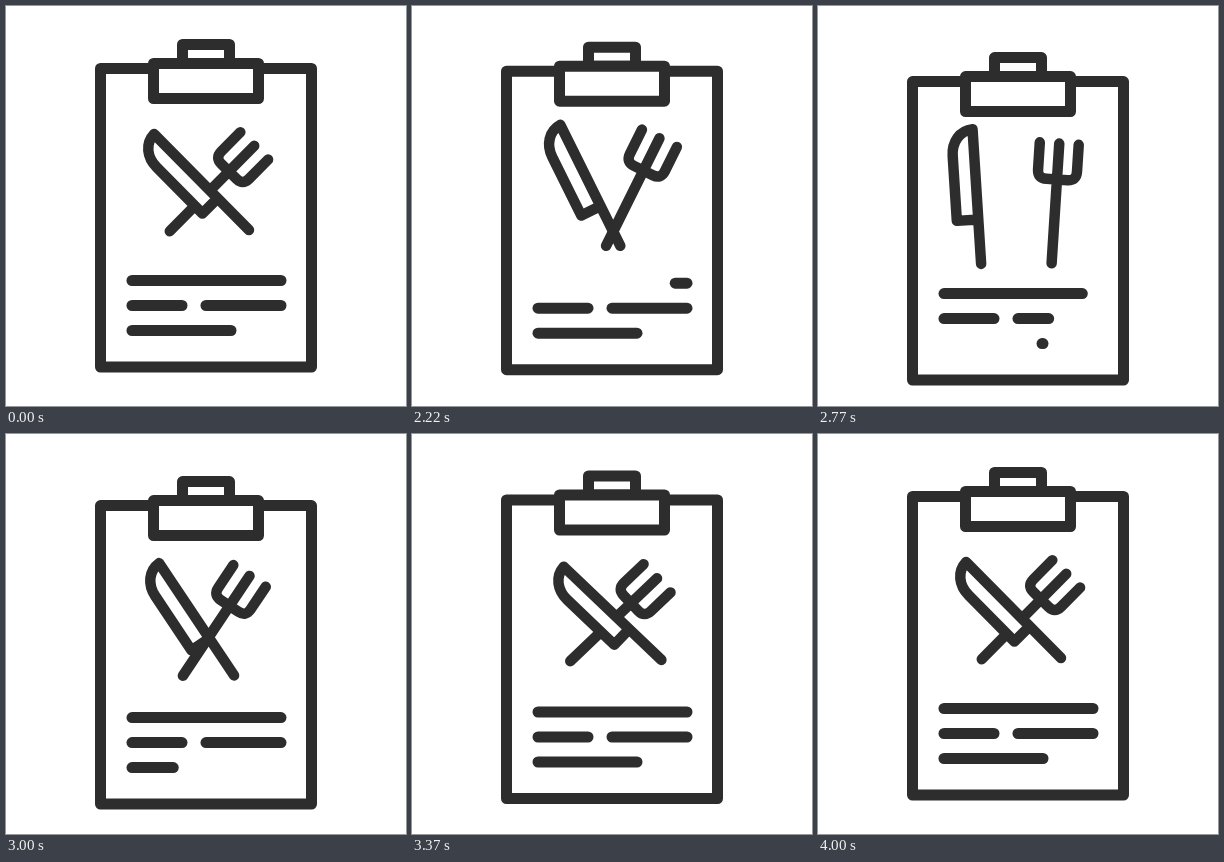
Write an HTML page with a canvas that moves like this. It is 400 px wide and 400 px high and loops after 4020 ms.

```html
<!DOCTYPE html>
<html lang="en">
<head>
<meta charset="utf-8">
<title>Menu clipboard</title>
<style>
  html, body { margin: 0; width: 100%; height: 100%; overflow: hidden; background: #fff; }
  canvas { display: block; width: 100vw; height: 100vh; }
</style>
</head>
<body>
<canvas id="stage"></canvas>
<script>
const LOOP = 4020, SIZE = 400, INK = '#2d2d2d', PAPER = '#fff';
const canvas = document.getElementById('stage');
const ctx = canvas.getContext('2d');

const ease = u => (1 - Math.cos(Math.PI * Math.min(1, Math.max(0, u)))) / 2;
const phase = (t, from, to) => ease((t - from) / (to - from));

// Eased value from [time, value] keys
function track(t, keys) {
  let [time, value] = keys[0];
  for (const [nextTime, nextValue] of keys) {
    if (t < nextTime) return value + (nextValue - value) * phase(t, time, nextTime);
    time = nextTime;
    value = nextValue;
  }
  return value;
}

const TILT = [[2000, 44.7], [2500, 0], [2680, 0], [3200, 49.6], [3620, 40.4], [4000, 44.7]];
const SPREAD = [[2000, 0], [2500, 1], [2660, 1], [3200, -0.26], [3610, 0.115], [4000, 0]];

// Each row is erased from the left, then written again
const ROWS = [
  { y: 274.5, parts: [[126, 275]], erase: [2000, 2270], write: [2498, 2828] },
  { y: 299.5, parts: [[126, 176], [200, 275]], erase: [2240, 2510], write: [2575, 2905] },
  { y: 324.5, parts: [[126, 225]], erase: [2490, 2790], write: [2800, 3250] }
];

const KNIFE = new Path2D('M0 23H-21.5V-42C-21.5 -56 -13 -67 0 -67.5V67.5');
const FORK = new Path2D('M0 60V-60M-19.5 -60V-33Q-19.5 -24 -10.5 -24H10.5Q19.5 -24 19.5 -33V-60');

function bob(t) {
  if (t < 2750) return 13.3 * phase(t, 2000, 2750);
  const u = Math.min(1, (t - 2750) / 1250);
  return 13.3 * (1 - ease(u ** 0.6));
}

function box(x, y, w, h) {
  ctx.beginPath();
  ctx.rect(x, y, w, h);
  ctx.fill();
  ctx.stroke();
}

function drawBoard() {
  box(94.5, 62.5, 211, 298.5);
  box(176.5, 38.5, 47, 19);
  box(147.5, 57.5, 105, 35);
}

function drawRow(row, t) {
  const total = row.parts.reduce((sum, [a, b]) => sum + b - a, 0);
  const writing = t >= row.write[0];
  const start = writing ? 0 : total * phase(t, ...row.erase);
  const end = writing ? total * phase(t, ...row.write) : total;
  let done = 0;
  for (const [a, b] of row.parts) {
    const x1 = Math.max(a, a + start - done);
    const x2 = Math.min(b, a + end - done);
    if (x2 - x1 > 0.01) {
      ctx.beginPath();
      ctx.moveTo(x1, row.y);
      ctx.lineTo(x2, row.y);
      ctx.stroke();
    }
    done += b - a;
  }
}

function drawTool(path, x, y, degrees, filled) {
  ctx.save();
  ctx.translate(x, y);
  ctx.rotate(degrees * Math.PI / 180);
  if (filled) ctx.fill(path);
  ctx.stroke(path);
  ctx.restore();
}

function draw(t) {
  const scale = window.devicePixelRatio || 1;
  const w = Math.round(innerWidth * scale), h = Math.round(innerHeight * scale);
  if (canvas.width !== w || canvas.height !== h) {
    canvas.width = w;
    canvas.height = h;
  }
  ctx.setTransform(w / SIZE, 0, 0, h / SIZE, 0, 0);
  ctx.fillStyle = PAPER;
  ctx.fillRect(0, 0, SIZE, SIZE);
  ctx.strokeStyle = INK;
  ctx.lineWidth = 11;
  ctx.lineCap = ctx.lineJoin = 'round';

  ctx.translate(0, bob(t));
  drawBoard();
  for (const row of ROWS) drawRow(row, t);

  const tilt = track(t, TILT), spread = track(t, SPREAD);
  ctx.lineWidth = 10.5;
  drawTool(FORK, 206 + 36 * spread, 182.5 + 2.2 * spread, tilt, false);
  drawTool(KNIFE, 195.5 - 42 * spread, 176 + 1.7 * spread, -tilt, true);
}

const begin = performance.now();
function tick() {
  draw((performance.now() - begin) % LOOP);
  requestAnimationFrame(tick);
}
tick();
</script>
</body>
</html>
```
